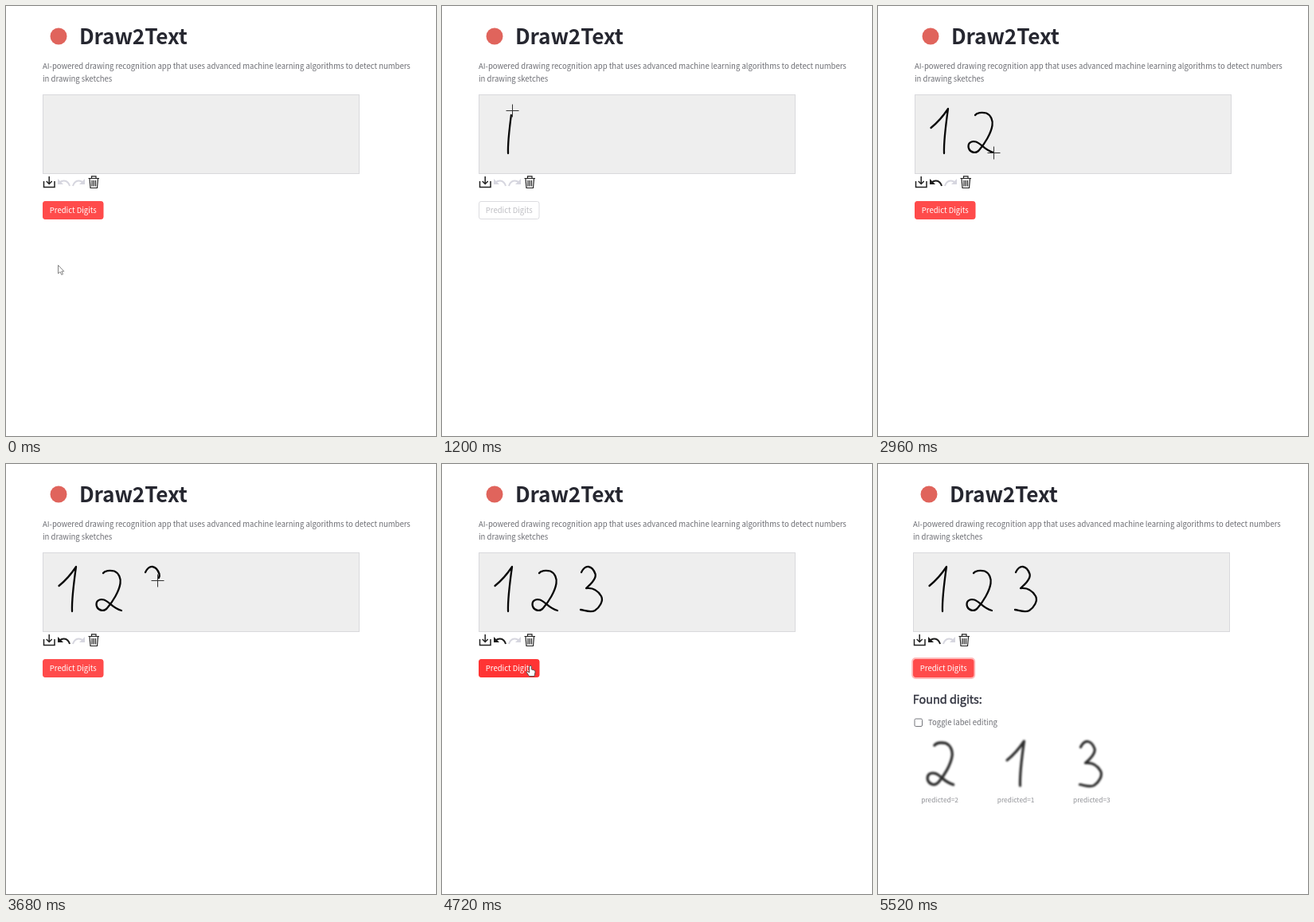
Write an HTML page that moves like this. It is 540x540 px and loops after 6 s.

```html
<!DOCTYPE html>
<html lang="en">
<head>
<meta charset="utf-8">
<title>Draw2Text</title>
<style>
  html, body { margin: 0; width: 100%; height: 100%; overflow: hidden; background: #fff; }
  svg { display: block; width: 540px; height: 540px; }
  text { font: 9.52px "Noto Sans CJK JP", "Noto Sans CJK SC", "Noto Sans CJK", "Source Sans Pro", "Open Sans", sans-serif; fill: #6c6d73; }
  .title { font-size: 26.2px; font-weight: 700; letter-spacing: -.005em; fill: #262730; }
  .sub { font-size: 14.4px; fill: #31333f; stroke: #31333f; stroke-width: .45; }
  .note { font-size: 8.35px; fill: #929398; }
  .ink { fill: none; stroke: #080808; stroke-width: 2.3; stroke-linecap: round; stroke-linejoin: round; }
  .found { fill: none; stroke: #2c2c2c; stroke-width: 3.2; stroke-linecap: round; stroke-linejoin: round; filter: blur(.8px); }
  .icon { fill: none; stroke: #222; stroke-width: 1.5; }
  .bin { stroke-width: 1.2; }
  .arrow { color: #d6d6df; }
  .arrow.on { color: #1c1c1c; }
  #face { fill: #ff4b4b; stroke: #ff4b4b; }
  #label { fill: #fff; }
  .hover #face { fill: #ff3434; stroke: #ff3434; }
  .off #face { fill: #fff; stroke: #dcdce0; }
  .off #label { fill: #bebec3; }
</style>
</head>
<body>
<svg viewBox="0 0 540 540">
  <defs>
    <path id="one" pathLength="1" d="M83 185 C82.500 172 85 150 88 129 C82 138 74 147 66.500 153"/>
    <path id="two" pathLength="1" d="M122 137 C124 134 130 133 136 134.500 C142 137 144.500 144 143.500 150 C142 160 134 173 127 181 C123 186 116 184 114 179 C112 172 117 169 123 170.500 C130 173 134 181 145 184"/>
    <path id="three" pathLength="1" d="M175 136 C177 132 180 128.500 184 129 C188 129.500 191 134 192.500 138 C194 143 188 150 181 156 C190 155 196 159 200 166 C203 172 198 180 192 184 C187 187 180 184 174 183"/>
    <g id="turn">
      <path d="M65 217 V224 H72 Z" fill="currentColor"/>
      <path d="M67.500 221.500 C72 217.500 78 219.500 80 226" fill="none" stroke="currentColor" stroke-width="2"/>
    </g>
  </defs>

  <g id="page">
    <circle cx="66" cy="38" r="10.500" fill="#e0645c"/>
    <text class="title" x="92" y="48">Draw2Text</text>
    <text x="46" y="78.500">AI-powered drawing recognition app that uses advanced machine learning algorithms to detect numbers</text>
    <text x="46" y="95">in drawing sketches</text>

    <rect x="46.500" y="111.500" width="397" height="99" fill="#eee" stroke="#d9d9dc"/>
    <use class="ink" href="#one"/>
    <use class="ink" href="#two"/>
    <use class="ink" href="#three"/>

    <path class="icon" d="M47.500 220 V227.500 H61 V220 M54.200 214 V223 M50.700 220 L54.200 223.500 L57.700 220"/>
    <use id="undo" class="arrow" href="#turn"/>
    <use class="arrow" href="#turn" transform="matrix(-1 0 0 1 164 0)"/>
    <path class="icon bin" d="M103.500 216.500 H117 M107.500 216 V213.800 H113 V216 M105 217 L106 228.500 H114.500 L115.500 217 M108 219 V226.500 M110.250 219 V226.500 M112.500 219 V226.500"/>

    <g id="button">
      <rect id="ring" x="45.200" y="244" width="78" height="25" rx="4" fill="none" stroke="#ffb9b9" stroke-width="2"/>
      <rect id="face" x="46.500" y="245.500" width="75.500" height="22" rx="2.500"/>
      <text id="label" x="54.800" y="260.300">Predict Digits</text>
    </g>
  </g>

  <g id="results">
    <text class="sub" x="43.800" y="301">Found digits:</text>
    <rect x="46" y="320" width="9.500" height="9.500" rx="1.500" fill="#fff" stroke="#75767c"/>
    <text x="63" y="328.300">Toggle label editing</text>
    <use class="found" href="#two" transform="matrix(1.03 0 0 1.05 -54.8 209.5)"/>
    <use class="found" href="#one" transform="translate(95.500 219)"/>
    <use class="found" href="#three" transform="translate(79.500 219.500)"/>
    <text class="note" x="54.300" y="425">predicted=2</text>
    <text class="note" x="149.800" y="425">predicted=1</text>
    <text class="note" x="245" y="425">predicted=3</text>
  </g>

  <g id="pointer">
    <path id="cross" d="M-8 0 H8 M0 -8 V8" stroke="#333" fill="none"/>
    <path id="tip" d="M.5 .5 V11 L3 8.800 L4.800 12.500 L6.500 11.700 L4.800 8.200 H7.800 Z" fill="#fff" stroke="#777" stroke-width=".9"/>
    <path id="hand" d="M-1.300 1 Q0 -.8 1.300 1 V5 L5 6 Q6.300 6.500 6 8.500 L5 13.500 H-1.500 L-4.800 8.500 Q-4.500 6.500 -1.300 9 Z" fill="#fff" stroke="#444" stroke-width=".9"/>
  </g>
</svg>
<script>
const LOOP = 6000, STEP = 80, LAG = 26;
const CLICK = 4800, DONE = 5120;
const $ = id => document.getElementById(id);
const show = (el, on) => { el.style.display = on ? '' : 'none'; };

// Drawing progress of each digit: [time, fraction]
const strokes = [
  ['one', [[960, 0], [1200, .61], [1600, 1]]],
  ['two', [[2240, 0], [2960, 1]]],
  ['three', [[3440, 0], [3680, .31], [4160, .72], [4480, 1]]]
].map(([id, keys]) => {
  const path = $(id);
  return { path, keys, ink: document.querySelector(`.ink[href="#${id}"]`), length: path.getTotalLength() };
});

// Pointer between the digits: [time, x, y]
const moves = [
  [80, 65, 325], [640, 83, 191], [720, 83, 189], [880, 83, 186], [960, 83, 185],
  [1600, 66.5, 153], [2080, 127, 134], [2240, 122, 137],
  [2960, 145, 184], [3440, 175, 136],
  [4480, 174, 183], [4720, 111, 253], [4800, 111, 258]
];

function at(keys, t, i = 1) {
  const n = keys.findIndex(k => k[0] > t);
  if (n === 0) return keys[0][i];
  if (n < 0) return keys[keys.length - 1][i];
  const a = keys[n - 1], b = keys[n];
  return a[i] + (b[i] - a[i]) * (t - a[0]) / (b[0] - a[0]);
}

function pointerAt(t) {
  for (const { path, keys, length } of strokes) {
    if (t >= keys[0][0] && t < keys[keys.length - 1][0]) return path.getPointAtLength(at(keys, t) * length);
  }
  return { x: at(moves, t, 1), y: at(moves, t, 2) };
}

const inside = (p, x, y, w, h) => p.x >= x && p.x <= x + w && p.y >= y && p.y <= y + h;

function draw(t) {
  for (const { ink, keys } of strokes) {
    const end = keys[keys.length - 1][0];
    const part = t >= end ? 1 : at(keys, t - LAG);
    show(ink, part > 0);
    ink.style.strokeDasharray = part < 1 ? `${part} 2` : 'none';
  }

  const p = pointerAt(t);
  const off = t >= 400 && t < 2320;
  const drawing = inside(p, 46, 111, 398, 100);
  const over = !off && inside(p, 46, 245, 77, 24);
  const done = t >= DONE;
  const nudge = drawing ? .5 : 0;

  $('pointer').setAttribute('transform', `translate(${Math.round(p.x) + nudge} ${Math.round(p.y) + nudge})`);
  show($('pointer'), !done);
  show($('cross'), drawing);
  show($('hand'), over);
  show($('tip'), !drawing && !over);

  $('button').setAttribute('class', off ? 'off' : over && !done ? 'hover' : '');
  show($('ring'), t >= CLICK);
  $('undo').classList.toggle('on', t >= 1760);
  $('page').setAttribute('transform', `translate(${done ? -2 : 0} 0)`);
  show($('results'), done);
}

const start = performance.now();
function tick() {
  const t = (performance.now() - start) % LOOP;
  draw(Math.floor(t / STEP) * STEP);
  requestAnimationFrame(tick);
}
tick();
</script>
</body>
</html>
```
